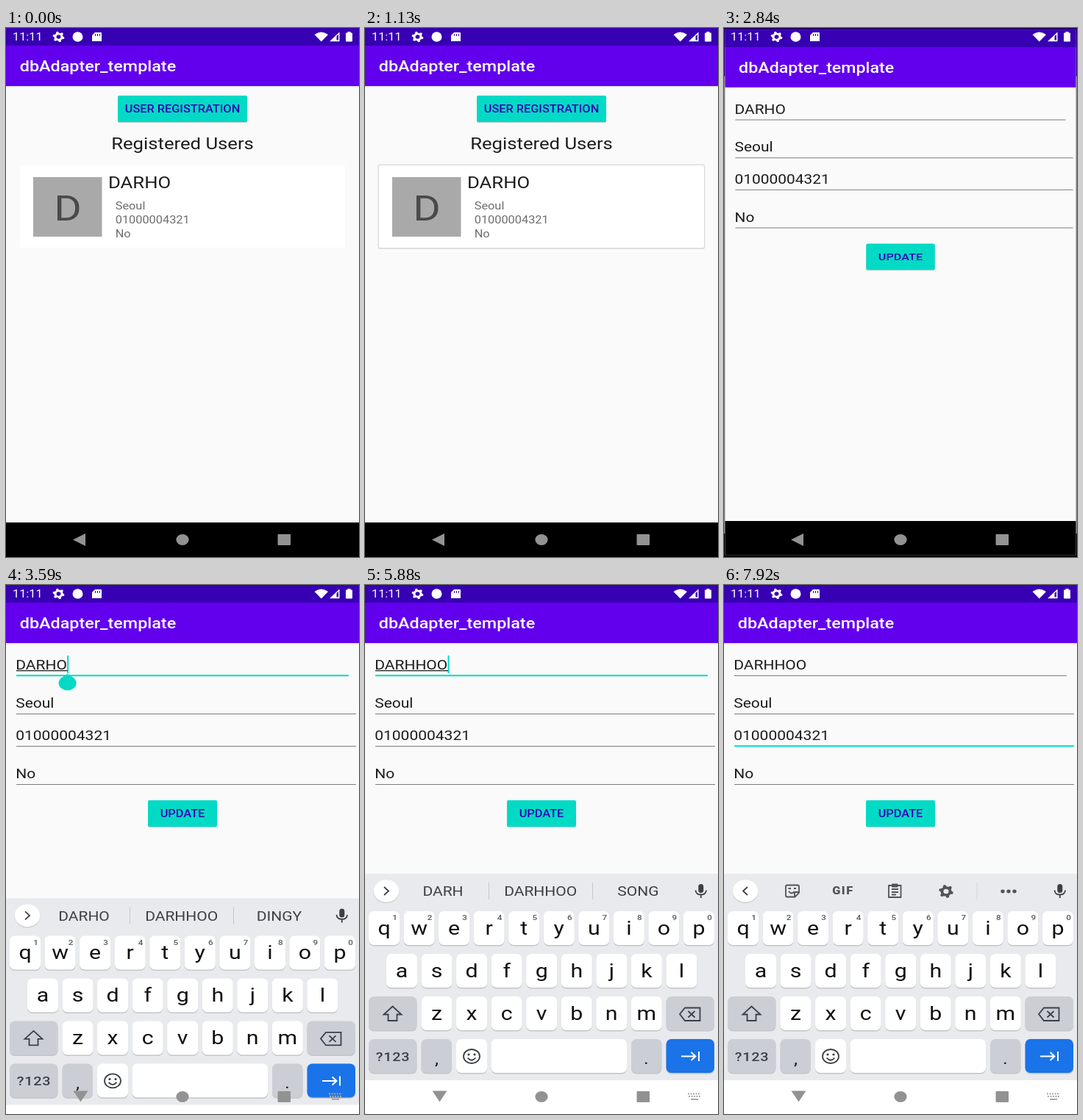
An HTML page with a canvas for the animation above (8000 ms loop, 480 by 720 pixels).

```html
<!DOCTYPE html>
<html lang="en">
<head>
<meta charset="utf-8">
<style>
  html, body { margin: 0; width: 100%; height: 100%; overflow: hidden; }
  canvas { display: block; }
</style>
</head>
<body>
<canvas id="stage" width="480" height="720"></canvas>
<script>
const ctx = document.getElementById('stage').getContext('2d');
const LOOP = 8000;
// The phone is 411 x 731 dp, shown on a 480 x 720 stage
const SX = 480 / 411.43, SY = 720 / 731.43;
const PAPER = '#fafafa', INK = '#1c1c1c', TEAL = '#03dac5', ICON = '#3c4043', LIGHT = '#fff';
const PHONE = '01000004321';

const FOCUS = 3110, NEXT_1 = 6250, NEXT_2 = 6960;
const OPEN = { start: 2628, length: 400 };
const SLIDE = { start: 3420, length: 320 };
const EDITS = [[0, 'DARHO'], [4130, 'DARH'], [4670, 'DARHH'], [4880, 'DARHHH'],
  [5090, 'DARHH'], [5340, 'DARHHO'], [5590, 'DARHHOO']];
const HINTS = [[0, ['DARHO', 'DARHHOO', 'DINGY']], [4290, ['DARH', 'DARHHOO', 'SONG']],
  [6460, ['Seoul', 'SEOUL', '']], [7250, null]];

const clamp = v => Math.min(1, Math.max(0, v));
const phase = (t, { start, length }) => clamp((t - start) / length);
const latest = (list, t) => list.filter(e => e[0] <= t).pop();

// Cubic segment through (x0,y0)..(x3,y3), solved for y at x
function bezier(x, x0, y0, x1, y1, x2, y2, x3, y3) {
  const mix = (s, a, b, c, d) =>
    a * (1 - s) ** 3 + 3 * b * s * (1 - s) ** 2 + 3 * c * s * s * (1 - s) + d * s ** 3;
  let lo = 0, hi = 1;
  for (let i = 0; i < 24; i++) {
    const mid = (lo + hi) / 2;
    if (mix(mid, x0, x1, x2, x3) < x) lo = mid; else hi = mid;
  }
  return mix(lo, y0, y1, y2, y3);
}
const easeOpen = x => x < 1 / 6
  ? bezier(x, 0, 0, .05, 0, .1333, .06, .1667, .4)
  : bezier(x, .1667, .4, .2083, .82, .25, 1, 1, 1);
const easeSlide = x => bezier(x, 0, 0, .2, 0, 0, 1, 1, 1);

function rect(x, y, w, h, color, r = 0) {
  ctx.fillStyle = color;
  ctx.beginPath();
  ctx.roundRect(x, y, w, h, r);
  ctx.fill();
}
function oval(x, y, rx, ry, color) {
  ctx.fillStyle = color;
  ctx.beginPath();
  ctx.ellipse(x, y, rx, ry, 0, 0, 7);
  ctx.fill();
}
function fill(d, color) {
  ctx.fillStyle = color;
  ctx.fill(new Path2D(d), 'evenodd');
}
function line(d, color, width = 1.8) {
  ctx.strokeStyle = color;
  ctx.lineWidth = width;
  ctx.stroke(new Path2D(d));
}
function setFont(size, weight = 400, spacing = 0) {
  ctx.font = `${weight} ${size}px Roboto, sans-serif`;
  ctx.letterSpacing = spacing + 'px';
}
function label(str, x, y, size, color, { align = 'left', weight, spacing } = {}) {
  ctx.save();
  ctx.translate(x, y);
  ctx.scale(SX, SY);
  setFont(size, weight, spacing);
  ctx.textAlign = align;
  ctx.fillStyle = color;
  ctx.fillText(str, 0, 0);
  ctx.restore();
}
function widthOf(str, size) {
  setFont(size);
  return ctx.measureText(str).width * SX;
}
function gear(x, y, r, color) {
  ctx.fillStyle = color;
  ctx.beginPath();
  for (let i = 0; i < 24; i++) {
    const a = (i + .5) * Math.PI / 12, q = i % 4 < 2 ? r : r * .74;
    ctx.lineTo(x + q * Math.cos(a) * 1.1, y + q * Math.sin(a));
  }
  ctx.closePath();
  ctx.ellipse(x, y, r * .4, r * .36, 0, 0, 7);
  ctx.fill('evenodd');
}

function frame() {
  rect(0, 0, 480, 720, PAPER);
  rect(0, 79, 480, 1.5, '#e4e4e8');
  rect(0, 0, 480, 79, '#6200ee');
  rect(0, 0, 480, 24, '#3700b3');
  rect(0, 673, 480, 47, '#000');
  label('dbAdapter_template', 18.7, 59, 20, LIGHT, { weight: 500 });
}
function button(str, x, y, w) {
  rect(x, y + 1, w, 36, '#c4d0d0', 2);
  rect(x, y, w, 36, TEAL, 2);
  label(str, x + w / 2, y + 23, 14, '#3700b3', { align: 'center', weight: 500 });
}

function drawList(t) {
  frame();
  button('USER REGISTRATION', 152, 92, 176);
  label('Registered Users', 240, 165, 22, INK, { align: 'center' });
  const edge = clamp(t / 840);
  rect(17.5, 185.5, 445, 115.5, `rgba(222,222,226,${edge})`, 3);
  rect(19, 187, 442, 112, '#fff', 2);
  rect(37, 203, 93.5, 81, '#a9a9a9');
  label('D', 84, 262, 49, '#4a4a4a', { align: 'center' });
  label('DARHO', 139, 217.5, 22, INK);
  ['Seoul', PHONE, 'No'].forEach((s, i) => label(s, 148.7, 247 + i * 19.1, 14, '#6e6e6e'));
}

function drawForm(t) {
  frame();
  const name = latest(EDITS, t);
  const focus = t < FOCUS ? -1 : t < NEXT_1 ? 0 : t < NEXT_2 ? 1 : 2;
  const since = Math.max(focus < 0 ? 0 : [FOCUS, NEXT_1, NEXT_2][focus], name[0]);
  const rows = [[name[1], 123], ['Seoul', 175], [PHONE, 219], ['No', 271]];

  rows.forEach(([str, y], i) => {
    const active = i === focus;
    label(str, 13.2, y - 7.7, 18, INK);
    rect(14, y - (active ? .7 : 0), i ? 462 : 452, active ? 2 : 1, active ? TEAL : '#7c7c80');
    if (active && (t - since) % 1000 < 500)
      rect(i ? 14 : 13.5 + widthOf(str, 18), y - 27, 2, 24, TEAL);
  });
  if (focus === 0) {
    const marked = name[1] === 'DARHHH' ? 'DARHH' : name[1];
    rect(14, 116, widthOf(marked, 18), 1.2, INK);
    if (t < EDITS[1][0]) {
      const x = 14 + widthOf(name[1], 18);
      fill(`M${x} 121L${x + 9} 127H${x - 9}Z`, TEAL);
      oval(x, 133.5, 12, 10, TEAL);
    }
  }
  button('UPDATE', 193, 293, 94);
}

function drawStatus() {
  label('11:11', 9, 17.3, 14, LIGHT);
  gear(71.5, 12, 7.3, LIGHT);
  oval(97.5, 12, 7, 6.8, LIGHT);
  fill('M121 6H129Q130 6 130 7V18H117V10ZM121 8h1v3h-1ZM124 8h1v3h-1ZM127 8h1v3h-1Z', LIGHT);
  fill('M419.5 9Q428.5 2 438 9L428.7 18.5Z', LIGHT);
  fill('M440 18.2L453.5 5.5V18.2ZM449.5 11V16.5H452V9Z', LIGHT);
  rect(464.5, 5, 4, 3, LIGHT);
  rect(462, 6.5, 9, 12, LIGHT, 1);
}

function drawNav(typing) {
  const color = '#929292';
  fill(typing ? 'M91.5 688.5H111.5L101.5 703.5Z' : 'M108 688V705L91 696.5Z', color);
  oval(240, 696.5, 8.6, 7.4, color);
  rect(369.5, 689, 17.5, 15, color, 1);
  if (typing) {
    ctx.setLineDash([2, 1.5]);
    line('M439 692.5H457M440 696H457', '#a8a8a8', 2);
    ctx.setLineDash([]);
    line('M443 700H453', '#a8a8a8', 2);
  }
}

function key(x, y, w = 42, color = '#fff') {
  rect(x, y + 1.5, w, 46, '#c3c5ca', 7);
  rect(x, y, w, 46, color, 7);
}
function letters(str, x, y) {
  [...str].forEach((c, i) => {
    const left = x + i * 47.55;
    key(left, y);
    label(c, left + 21, y + 31.5, 26, '#101010', { align: 'center' });
    if (y < 450) label((i + 1) % 10, left + 35.5, y + 12.3, 10, '#55585c', { align: 'center', weight: 500 });
  });
}

function drawHints(words) {
  oval(29, 417.5, 17.5, 15.5, '#c8cacf');
  oval(29, 416.5, 17.3, 15.3, '#fff');
  if (words) {
    line('M26 411L32 416.5L26 422', ICON);
    rect(168, 405, 1, 23, '#c6c8cc');
    rect(309, 405, 1, 23, '#c6c8cc');
    words.forEach((w, i) => label(w, 106 + i * 132.7, 423.3, 18, ICON, { align: 'center' }));
    return;
  }
  const c = '#505358';
  line('M32 411L26 416.5L32 422', ICON);
  line('M86 408.5H100Q102 408.5 102 410.5V419L96.5 424.5H86Q84 424.5 84 422.5V410.5Q84 408.5 86 408.5ZM102 418H96V424M88 417Q92 422 96 417M87.5 413H91M95 413H98', c);
  label('GIF', 162, 421, 14, c, { align: 'center', weight: 900, spacing: 1.3 });
  line('M224 409H240.5V425H224ZM228 414H237M228 418H237M228 421.5H234', c);
  rect(228, 406.5, 8.5, 5, c, 1);
  gear(302, 417, 9, c);
  rect(343.5, 405, 1, 23, '#d4d6da');
  [379, 387, 395].forEach(x => oval(x, 417, 2.7, 2.4, c));
}

function drawKeyboard(t) {
  const soft = '#ccced5';
  rect(0, 393, 480, 281, '#e8eaed');
  drawHints(latest(HINTS, t)[1]);
  rect(453.3, 407, 7, 12, ICON, 3.5);
  line('M449.5 415.5Q450 421.5 456.8 421.5T464 415.5M456.8 421.5V426', ICON);

  letters('qwertyuiop', 5, 444);
  letters('asdfghjkl', 29, 502);
  letters('zxcvbnm', 76.5, 560);
  key(5, 560, 65.5, soft);
  line('M37.5 573.5L49.5 584.5H43.5V593H31.5V584.5H25.5Z', ICON);
  key(409.5, 560, 65.5, soft);
  line('M428 584L435 575.5H455.5V593H435ZM439.5 580L448.5 588.5M448.5 580L439.5 588.5', ICON);

  key(5, 618, 65.5, soft);
  label('?123', 38, 648, 17, ICON, { align: 'center', weight: 500, spacing: .6 });
  key(76.5, 618, 41.5, soft);
  label(',', 97.5, 652, 22, INK, { align: 'center' });
  key(124, 618);
  ctx.strokeStyle = ICON;
  ctx.lineWidth = 1.8;
  ctx.beginPath();
  ctx.ellipse(145, 641.5, 11, 9.5, 0, 0, 7);
  ctx.stroke();
  oval(141, 639, 1.6, 1.5, ICON);
  oval(149, 639, 1.6, 1.5, ICON);
  line('M139.5 643.5Q145 650 150.5 643.5', ICON);
  key(171.5, 618, 184.5);
  key(362, 618, 41.5, soft);
  label('.', 382.5, 652, 22, INK, { align: 'center' });
  key(409.5, 618, 65.5, '#1a73e8');
  line('M430 641.5H449M443.5 636L449.5 641.5L443.5 647M454 635V648', '#fff', 2);
}

function draw(t) {
  ctx.globalAlpha = 1;
  const open = phase(t, OPEN), zoom = easeOpen(open);
  const scaled = (k, paint) => {
    ctx.save();
    ctx.translate(240, 360);
    ctx.scale(k, k);
    ctx.translate(-240, -360);
    paint(t);
    ctx.restore();
  };
  if (open < 1) {
    scaled(1 + .05 * zoom, drawList);
    rect(0, 0, 480, 720, `rgba(0,0,0,${.5 * zoom})`);
  }
  if (open > 0) {
    ctx.globalAlpha = clamp((t - OPEN.start - 50) / 83);
    scaled(.85 + .15 * zoom, drawForm);
    ctx.globalAlpha = 1;
  }
  drawStatus();

  const slide = phase(t, SLIDE);
  if (slide > 0) {
    rect(0, 673, 480, 47, `rgba(255,255,255,${clamp(slide * 2.2)})`);
    ctx.save();
    ctx.translate(0, 327 * (1 - easeSlide(slide)));
    drawKeyboard(t);
    ctx.restore();
  }
  drawNav(slide > 0);
}

function tick() {
  draw(performance.now() % LOOP);
  requestAnimationFrame(tick);
}
tick();
</script>
</body>
</html>
```
